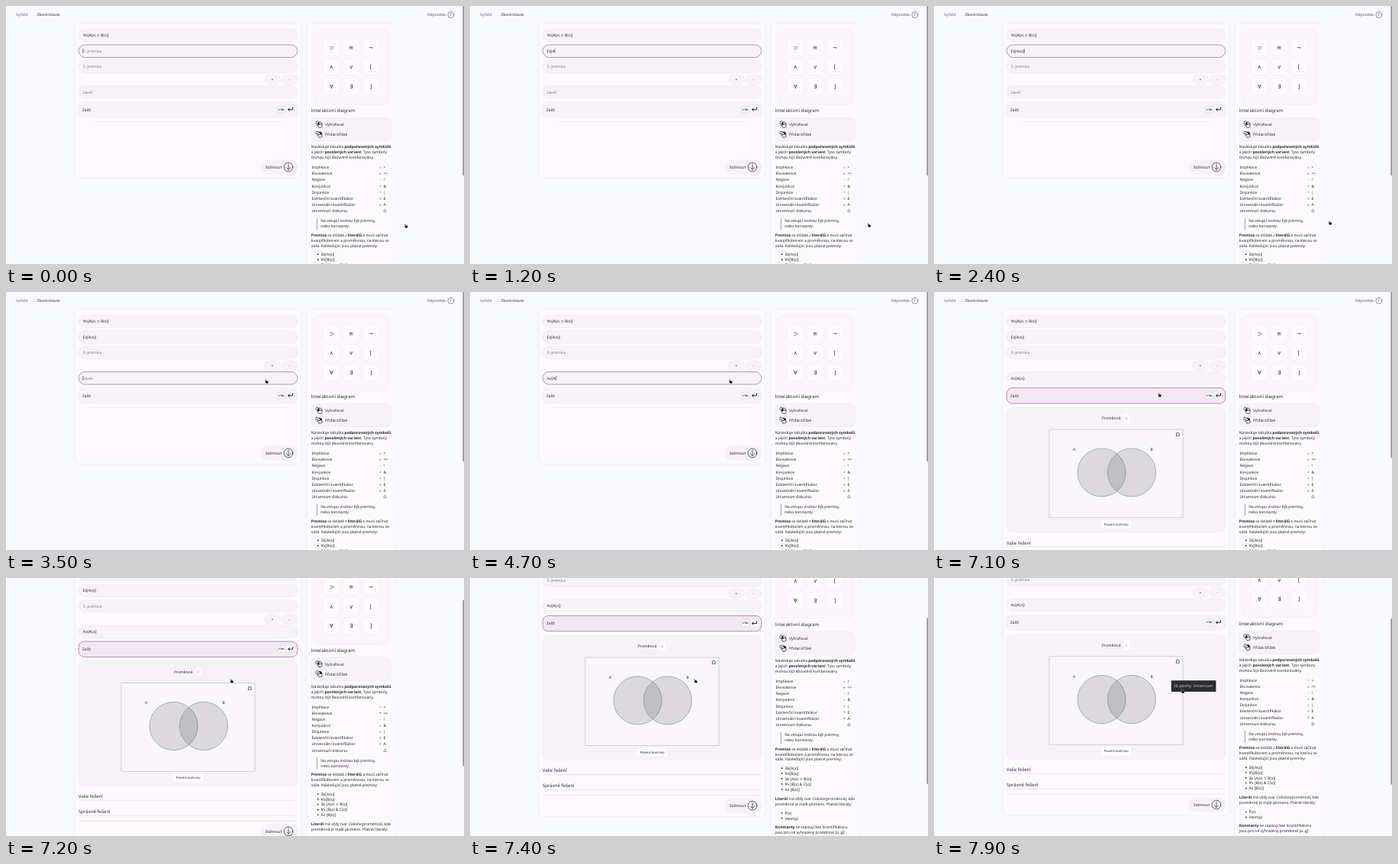
These frames come from a looping animation (600x338 px, 8 s). An HTML page:

```html
<!DOCTYPE html>
<html lang="cs">
<head>
<meta charset="utf-8">
<title>Kontrola úsudku</title>
<style>
html, body { margin: 0; width: 100%; height: 100%; overflow: hidden; background: #f9fafe; }
svg { display: block; width: 100vw; height: 100vh; }
text { font: 5px "Noto Sans", "DejaVu Sans", sans-serif; fill: #29272c; text-rendering: geometricPrecision; white-space: pre; }
.b { font-weight: 600; }
.h { font-size: 6px; font-weight: 500; }
.m { text-anchor: middle; }
.dim { fill: #7b787f; }
.sym { font-size: 3.8px; fill: #66636a; }
.key { font-size: 7px; font-family: "DejaVu Sans", sans-serif; }
.box { fill: #f6f3f8; stroke: #e9e5ec; stroke-width: .5; }
.light { fill: #fdfbfe; stroke: #eae6ed; stroke-width: .4; }
.card { fill: #fdfafd; filter: drop-shadow(0 0 1.6px #dcd6e299); }
.focus { fill: none; stroke: #8d7791; stroke-width: .7; }
.rule { stroke: #d9d6dd; stroke-width: .6; }
.ink { fill: none; stroke: #222; stroke-width: .7; stroke-linecap: round; stroke-linejoin: round; }
</style>
</head>
<body>
<svg id="stage" viewBox="0 0 600 338" preserveAspectRatio="none"></svg>
<script>
const LOOP = 8000, PANEL = 163.4, SCROLL = 77.4;

const rect = (x, y, w, h, r, cls, more = '') =>
  `<rect x="${x}" y="${y}" width="${w}" height="${h}" rx="${r}" class="${cls}" ${more}/>`;
const text = (x, y, s, cls = '', more = '') => `<text x="${x}" y="${y}" class="${cls}" ${more}>${s}</text>`;
const lines = (x, y, step, list, cls) => list.map((s, i) => text(x, y + i * step, s, cls)).join('');
const bullets = (y, list) => list.map((s, i) =>
  `<circle cx="408.6" cy="${y - 1.8 + i * 6.87}" r=".9" fill="#29272c"/>` + text(412.5, y + i * 6.87, s)).join('');
const rule = (x1, x2, y) => `<path d="M${x1} ${y}H${x2}" class="rule"/>`;
const bold = s => `<tspan class="b">${s}</tspan>`;
const pill = (y, h = 16.4) => rect(95.3, y, 286.4, h, 8, 'box');

function mouse(x, y, right) {
  const half = right ? 'M.2 -3V0H3V-1A2.6 2.6 0 0 0 .2 -3' : 'M-.2 -3V0H-3V-1A2.6 2.6 0 0 1 -.2 -3';
  return `<g transform="translate(${x} ${y}) rotate(-14)">
    <rect x="-2.8" y="-3.2" width="5.6" height="7.4" rx="2.7" class="ink"/>
    <path d="${half}Z" fill="#222"/><path d="M-2.8 .1H2.8M-4.4 -1.2V-3.6M-3.6 -4.6H-1.4" class="ink"/></g>`;
}

const header = text(13, 13.2, 'Vyřešit', '', 'style="fill:#69666d"') +
  rect(36.3, 5.2, 38.4, 12.8, 3, 'light') + text(40.7, 13.2, 'Zkontrolovat') +
  text(552, 13.2, 'Nápověda', '', 'style="fill:#5c5960"') +
  '<circle cx="582.7" cy="11.5" r="3.9" class="ink" style="stroke:#555;stroke-width:.6"/>' +
  text(582.7, 13.4, '?', 'm');

const form = pill(30) + text(100.7, 40.2, '∀x[A(x) ⊃ B(x)]') +
  pill(50.9) + text(100.7, 60.7, '', '', 'id="in2"') +
  pill(71.2) + text(100.7, 81.2, '3. premisa', 'dim') +
  rect(338.8, 90, 20.4, 12.8, 6.4, 'box') + text(349, 98.2, '+', 'm') +
  rect(361, 90, 20.4, 12.8, 6.4, 'box') + text(371.3, 98.2, '-', 'm') +
  pill(104.6) + text(100.7, 114.6, '', '', 'id="end"') +
  rect(95.3, 50.9, 286.4, 16.4, 8, 'focus', 'id="focus2"') +
  rect(95.3, 104.6, 286.4, 16.4, 8, 'focus', 'id="focusEnd"') +
  rect(95.3, 125.6, 286.4, 20.4, 7, 'box') +
  rect(95.3, 125.6, 286.4, 20.4, 7, '', 'id="hover" fill="#f1e8f2" stroke="#a47fa6" stroke-width=".8"') +
  text(100, 137.5, 'Začít') +
  rect(355.7, 131.2, 10.8, 8.6, 1.6, 'light', 'style="stroke:#bbb8be"') +
  text(361.1, 136.6, 'CTRL', 'm b', 'style="font-size:3.2px"') +
  rect(367.4, 131.2, 10.2, 8.6, 1.6, 'light') +
  '<path d="M375.6 133V135.7H369.8M371.5 134L369.6 135.7L371.5 137.4" class="ink" style="stroke-width:1"/>' +
  '<path id="caret" stroke="#222" stroke-width=".5"/>';

const diagram = text(220, 167.3, 'Proměnná') +
  rect(247, 158, 10.2, 15, 5, 'light') + text(252.1, 167, 'x', 'm dim', 'style="font-size:4.2px"') +
  rect(151, 180.2, 175, 115.6, 0, '', 'fill="#f9f7fb" stroke="#b9b6bc" stroke-width=".6"') +
  text(319.3, 189.2, 'Ω', 'm', 'style="font-size:7px"') +
  '<g fill="#000" fill-opacity=".12" stroke="#858585" stroke-width=".6">' +
  '<circle cx="219.6" cy="236.5" r="31.6"/><circle cx="259" cy="236.5" r="31.6"/></g>' +
  text(183.7, 208, 'A', 'm') + text(285.2, 208, 'B', 'm') +
  rect(218, 298.3, 41, 12, 3, 'light') + text(238.5, 305.8, 'Provést kontrolu', 'm', 'style="font-size:4.17px;font-weight:500"');

const results = '<g id="results">' + text(95, 167.2, 'Vaše řešení', 'h') + rule(95, 382, 170.4) +
  text(95, 186.8, 'Správné řešení', 'h') + rule(95, 382, 190.3) + rule(95, 382, 197.4) + '</g>' +
  rect(334.3, 202, 47.4, 18, 9, 'box') + text(339.8, 212.8, 'Stáhnout') +
  '<circle cx="370" cy="211" r="5.9" class="ink"/><path d="M370 207V214.4M367 211.6L370 214.6L373 211.6" class="ink"/>';

const keys = [...'⊃≡¬∧∨[∀∃]'].map((k, i) => {
  const x = 426.4 + i % 3 * 25.8, y = 54 + Math.floor(i / 3) * 25.7;
  return rect(x - 11, y - 11, 22, 22, 5, 'light') + text(x, y + 2.5, k, 'm key');
}).join('');

const table = [['Implikace', '⊃', '&gt;'], ['Ekvivalence', '≡', '&lt;&gt;'], ['Negace', '¬', '!'],
  ['Konjunkce', '∧', '&amp;'], ['Disjunkce', '∨', '|'], ['Existenční kvantifikátor', '∃', 'E'],
  ['Univerzální kvantifikátor', '∀', 'A'], ['Universum diskursu', '', 'Ω']].map(([name, a, b], i) => {
  const y = 213.2 + i * 8.12;
  return text(400.4, y, name) + text(490.3, y - .3, a, 'sym m') + text(494.4, y, b);
}).join('');

const sidebar = rect(394.3, 23.4, 115.4, 430, 6, 'card') +
  rect(404, 31.3, 96.6, 96.6, 7, 'card', 'style="fill:#fbf7fb"') + keys +
  text(399.8, 139.2, 'Interaktivní diagram', 'h') +
  rect(400, 146.4, 104.6, 30.6, 7, 'box') +
  mouse(411, 155.2, false) + text(418, 157.1, 'Vyšrafovat') +
  mouse(411, 168.2, true) + text(418, 170.2, 'Přidat křížek') +
  lines(399.8, 186.4, 6.9, ['Následuje tabulka ' + bold('podporovaných symbolů'),
    'a jejich ' + bold('povolených variant') + '. Tyto symboly', 'mohou být libovolně kombinovány.']) +
  table + '<path d="M407.3 277.6V293.2" stroke="#77747a" stroke-width=".7"/>' +
  lines(412.3, 283.2, 6.9, ['Na vstupu mohou být premisy,', 'nebo konstanty.']) +
  lines(399.8, 301.9, 6.87, [bold('Premisa') + ' se skládá z ' + bold('literálů') + ' a musí začínat',
    'kvantifikátorem a proměnnou, na kterou se', 'váže. Následující jsou platné premisy:']) +
  bullets(327.2, ['∃x[A(x)]', '∀x[B(x)]', '∃x [A(x) ⊃ B(x)]', '∀x [B(x) &amp; C(x)]', 'Ax [B(x)]']) +
  lines(399.8, 366.9, 6.87, [bold('Literál') + ' má vždy tvar Cokoliv(proměnná), kde',
    'proměnná je malé písmeno. Platné literály:']) +
  bullets(385.8, ['P(x)', 'Venn(y)']) +
  lines(399.8, 403.9, 6.87, [bold('Konstanty') + ' se zapisují bez kvantifikátoru.',
    'Jsou pro ně vyhrazeny proměnné [a..g]:']);

const $ = id => document.getElementById(id);
$('stage').innerHTML = `
  <clipPath id="fold"><rect id="foldBox" x="90" y="150" width="297"/></clipPath>
  <rect width="600" height="338" fill="#f9fafe"/>
  <g id="page">${header}${rect(90.3, 23.4, 296.4, 201.4, 6, 'card', 'id="card"')}${form}
    ${rect(95.3, 151.2, 286.4, 0, 8, 'box', 'id="panel"')}
    <g clip-path="url(#fold)"><g id="diagram">${diagram}</g></g>
    <g id="lower">${results}</g>${sidebar}</g>
  <rect id="thumb" x="598.5" width="1.5" rx=".6" fill="#8b898f"/>
  <g id="tip">${rect(310.8, 134.2, 58.6, 14.8, 1, '', 'fill="#2c2b2f"')}${text(340, 143.4, 'ID plochy: Universum', 'm', 'style="fill:#d5d3d8"')}</g>
  <path id="cursor" d="M.2 .3Q.8 -.3 1.3 .4L2 1.7L3.9 2.2Q4.6 2.5 4.4 3.4L4 5.2H1.5L-.2 3.5Q-.2 2.8 .9 2.9Z"
    fill="#111" stroke="#fff" stroke-width=".3"/>`;

// piecewise linear value of a [time, value] table
function at(steps, t) {
  if (t <= steps[0][0]) return steps[0][1];
  for (let i = 1; i < steps.length; i++) {
    const [t0, a] = steps[i - 1], [t1, b] = steps[i];
    if (t < t1) return a + (b - a) * (t - t0) / (t1 - t0);
  }
  return steps[steps.length - 1][1];
}
const phase = (t, from, to) => Math.min(1, Math.max(0, (t - from) / (to - from)));
const smooth = u => u * u * (3 - 2 * u);

const cursorX = [[0, 522], [850, 522], [900, 521.5], [2350, 518], [2400, 517], [2700, 470], [3000, 375], [3200, 339.3],
  [5450, 339.3], [5500, 338.8], [5650, 338.8], [6000, 294.2], [6100, 293.5], [7420, 293.5], [7800, 323.8]];
const cursorY = [[0, 285.6], [850, 285.6], [900, 285.2], [2350, 282], [2400, 281.6], [2700, 240], [3000, 148], [3200, 114.6],
  [5650, 114.6], [6000, 132.3], [7420, 132.3], [7800, 145.7]];
const hover = [[5820, 0], [6000, .65], [6400, .65], [6550, 1], [7410, 1], [7600, 0]];
const fields = [
  { id: 'in2', hint: '2. premisa', word: 'Ex[A(x)]', keys: [500, 700, 900, 1200, 1300, 1500, 1700, 1900], y: 56.2, on: [-1, 3250] },
  { id: 'end', hint: 'Závěr', word: 'Ax[A(x)]', keys: [3900, 4000, 4200, 4400, 4600, 4800, 5000, 5200], y: 110.1, on: [3250, 6450] }
];

function drawFields(t) {
  let caret = '';
  for (const f of fields) {
    const el = $(f.id), n = f.keys.filter(k => k <= t).length;
    const s = n ? f.word.slice(0, n) : f.hint;
    if (el.textContent !== s) el.textContent = s;
    el.setAttribute('class', n ? '' : 'dim');
    const last = n ? f.keys[n - 1] : Math.max(0, f.on[0]);
    const lit = (t - last) % 1040 < 520;
    if (t >= f.on[0] && t < f.on[1] && lit) {
      const x = 100.7 + (n ? el.getComputedTextLength() + .2 : -.1);
      caret = `M${x} ${f.y - .4}v5.8`;
    }
  }
  $('caret').setAttribute('d', caret || 'M0 0');
}

function draw(t) {
  drawFields(t);
  const swap = phase(t, 3250, 3450);
  $('focus2').setAttribute('opacity', 1 - swap);
  $('focusEnd').setAttribute('opacity', swap * (1 - phase(t, 6450, 6620)));
  $('hover').setAttribute('opacity', at(hover, t));

  const open = smooth(phase(t, 6480, 6960)), h = PANEL * open, k = .9 + .1 * open;
  $('card').setAttribute('height', 201.4 + h);
  $('panel').setAttribute('height', Math.max(.2, h));
  $('panel').setAttribute('width', 286.4 * k);
  $('panel').setAttribute('x', 238.5 - 143.2 * k);
  $('foldBox').setAttribute('height', h + 1);
  $('diagram').setAttribute('opacity', open);
  $('diagram').setAttribute('transform', `translate(${238.5 * (1 - k)} ${151 * (1 - k)}) scale(${k})`);
  $('lower').setAttribute('transform', `translate(0 ${h})`);
  $('results').setAttribute('opacity', open);

  const roll = 1 - (1 - phase(t, 7110, 7500)) ** 3;
  $('page').setAttribute('transform', `translate(0 ${-SCROLL * roll})`);
  $('thumb').setAttribute('y', 53 * roll);
  $('thumb').setAttribute('height', 222 - 4.5 * open);
  $('tip').setAttribute('opacity', phase(t, 7780, 7860));
  $('cursor').setAttribute('transform', `translate(${at(cursorX, t)} ${at(cursorY, t)})`);
}

const start = performance.now();
function tick() {
  draw((performance.now() - start) % LOOP);
  requestAnimationFrame(tick);
}
tick();
</script>
</body>
</html>
```
